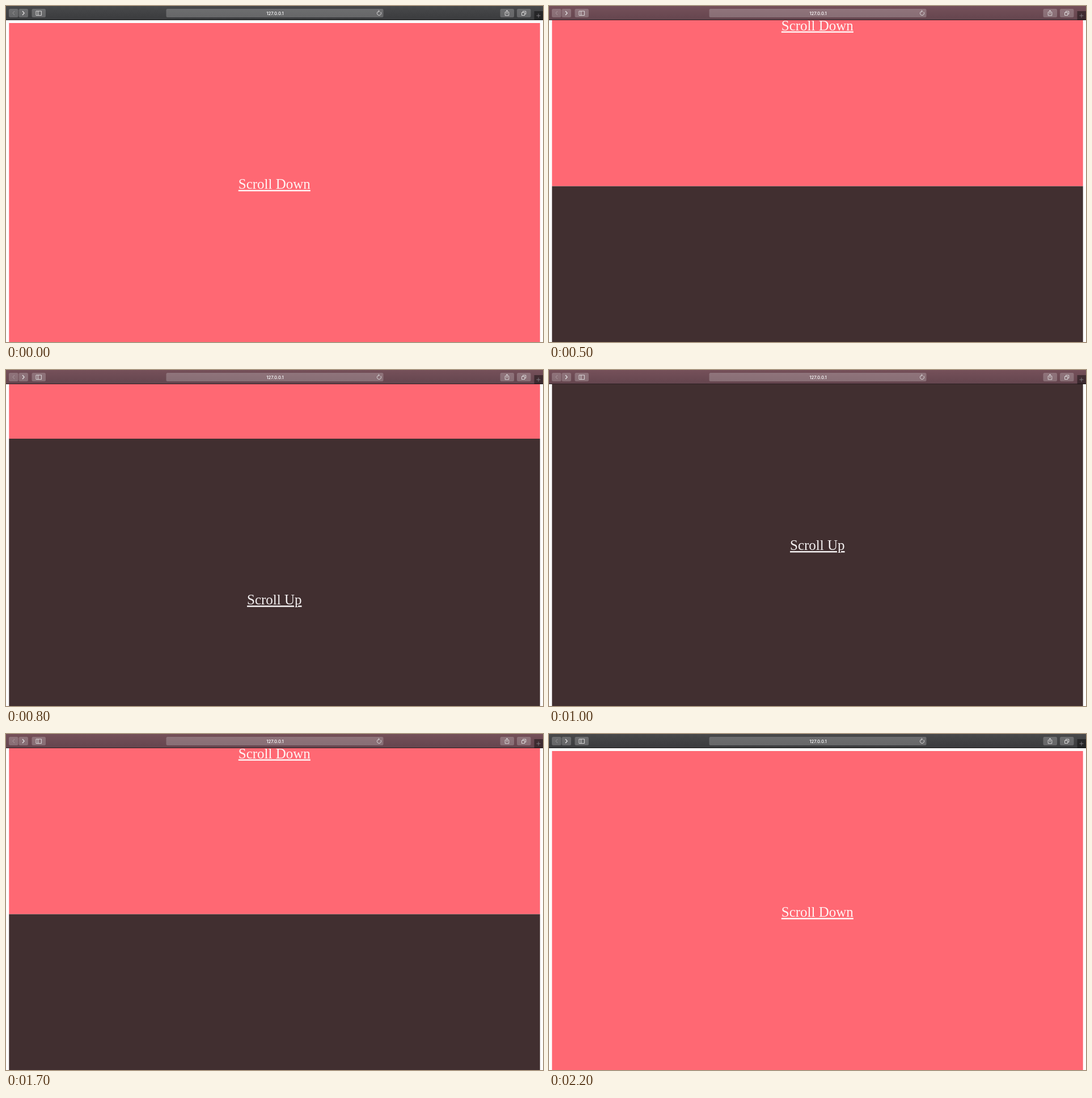
Write an HTML page that moves like this. It is 947 by 592 pixels and loops after 2.3 s.

```html
<!DOCTYPE html>
<html lang="en">
<head>
<meta charset="utf-8">
<title>Smooth scroll</title>
<style>
html, body { margin: 0; width: 100%; height: 100%; overflow: hidden; background: #fff; }
svg { display: block; }
.link { font: 25px "Liberation Serif", "Times New Roman", serif; text-anchor: middle; text-decoration: underline; }
.address { font: 500 7.8px Inter, Roboto, sans-serif; text-anchor: middle; fill: #fff; }
.buttons { fill: #fff; fill-opacity: .21; }
.icons { fill: none; stroke: #e4e2e3; stroke-width: 1; }
</style>
</head>
<body>
<svg width="947" height="592" viewBox="0 0 947 592">
  <defs>
    <linearGradient id="grey" x2="0" y2="1">
      <stop stop-color="#48494b"/><stop offset="1" stop-color="#3a3b3d"/>
    </linearGradient>
    <linearGradient id="rose" x2="0" y2="1">
      <stop stop-color="#755059"/><stop offset="1" stop-color="#64454e"/>
    </linearGradient>
  </defs>

  <g id="page">
    <rect x="5.3" y="30" width="936.4" height="567" fill="#ff6873"/>
    <rect x="5.3" y="597" width="936.4" height="567" fill="#412f30"/>
    <text class="link" x="473.3" y="322" fill="#fff3f3">Scroll Down</text>
    <text class="link" x="473.3" y="889" fill="#f3f0f0">Scroll Up</text>
  </g>

  <rect width="947" height="25" fill="url(#grey)"/>
  <rect id="tint" width="947" height="25" fill="url(#rose)"/>
  <rect y="24" width="947" height="1" fill="#000" fill-opacity=".55"/>
  <g class="buttons">
    <rect x="5" y="5" width="16.5" height="15" rx="2.5"/>
    <rect x="22.5" y="5" width="16.5" height="15" rx="2.5"/>
    <rect x="45.5" y="5" width="24.5" height="15" rx="2.5"/>
    <rect x="282.5" y="5" width="383" height="15" rx="2.5"/>
    <rect x="871.5" y="5" width="24.5" height="15" rx="2.5"/>
    <rect x="901" y="5" width="24.5" height="15" rx="2.5"/>
  </g>
  <g class="icons">
    <path d="M15 9l-3 3.5 3 3.5" opacity=".35"/>
    <path d="M29 9l3.2 3.5-3.2 3.5" stroke-width="1.2"/>
    <path d="M53 9h9.5v7.5h-9.5zM56.5 9v7.5" stroke-width=".9"/>
    <path d="M660.8 10.6a3.6 3.6 0 1 1-3-1.4M656.6 7.4l2 1.8-2 1.8" stroke-width=".9"/>
    <path d="M882 10.8h-1.8v6h6.6v-6h-1.8M883.5 14v-6.3M881.5 9.5l2-2 2 2" stroke-width=".9"/>
    <path d="M909.5 11.5h5.2v5h-5.2zM911.5 11.5v-2.3h5.3v5h-2" stroke-width=".9"/>
  </g>
  <text class="address" x="474.5" y="15.6">127.0.0.1</text>
  <rect x="931.5" y="9" width="15.5" height="16" fill="#000" fill-opacity=".42"/>
  <path d="M935.5 17h7M939 13.5v7" stroke="#858386" stroke-width=".9"/>
</svg>
<script>
const page = document.getElementById("page");
const tint = document.getElementById("tint");
const STEP = 100, LOOP = 2300;
// Eased scroll offset after each step; the way back mirrors the way down.
const offsets = [0, 18, 68, 136, 208, 279.5, 350, 416, 476, 530, 572];
const start = performance.now();

function draw() {
  const step = Math.floor(((performance.now() - start) % LOOP) / STEP);
  const scroll = offsets[Math.min(step, 22 - step, offsets.length - 1)];
  page.setAttribute("transform", `translate(0 ${-scroll})`);
  tint.setAttribute("opacity", Math.min(scroll / 30, 1));
  requestAnimationFrame(draw);
}
draw();
</script>
</body>
</html>
```
